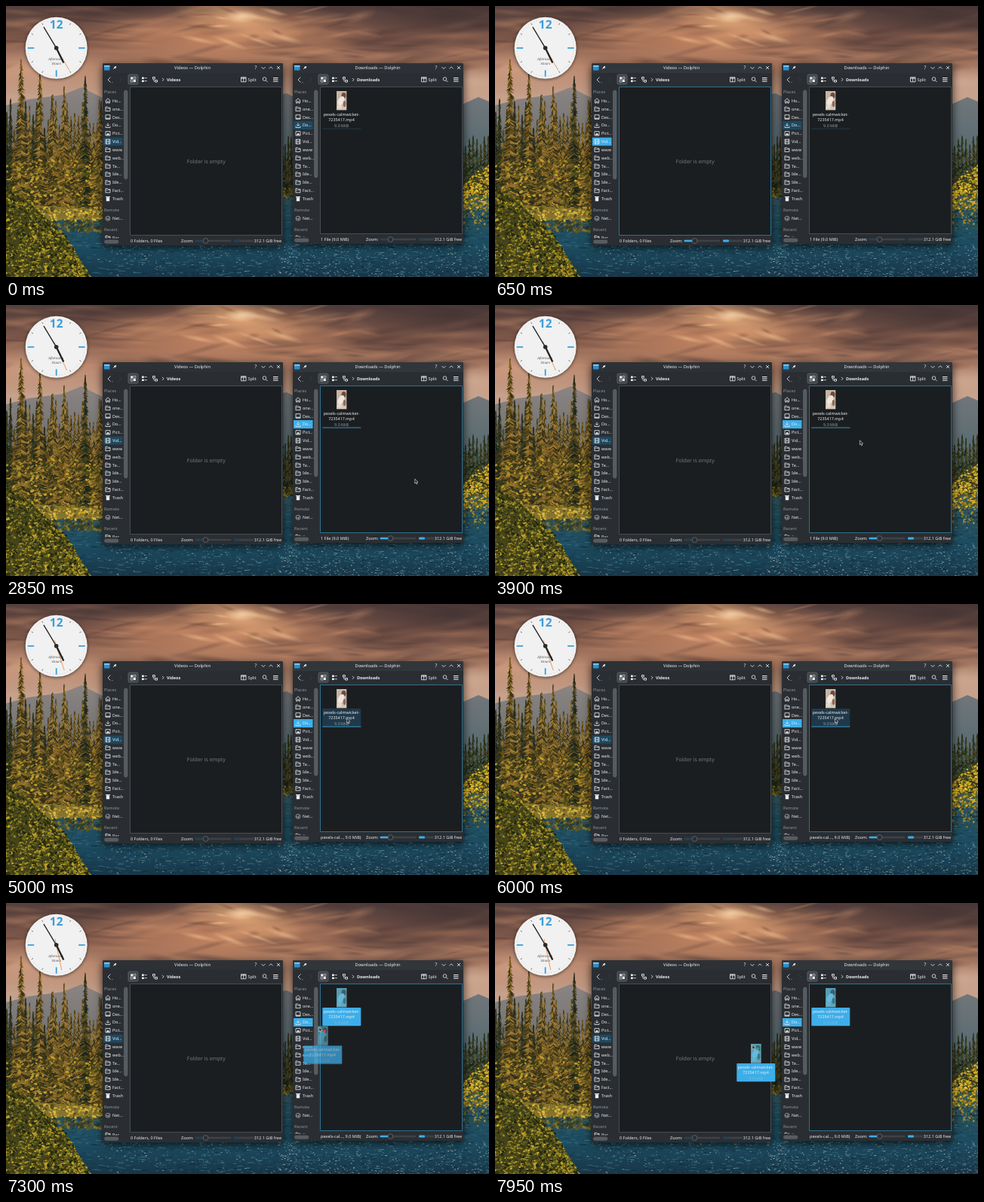
An HTML page with a canvas for the animation above (8000 ms loop, 640 px wide and 360 px high).

```html
<!DOCTYPE html>
<html lang="en">
<head>
<meta charset="utf-8">
<title>Desktop file drag</title>
<style>
html, body { margin: 0; width: 100%; height: 100%; overflow: hidden; background: #1b1e20; }
canvas { display: block; width: 640px; height: 360px; }
</style>
</head>
<body>
<canvas id="stage" width="640" height="360"></canvas>
<script>
const LOOP = 8000;
const BLUE = '#3daee9', TEXT = '#eceef0', DIM = '#8f9498';
const stage = document.getElementById('stage').getContext('2d');
let c = stage;

const clamp = (v) => Math.max(0, Math.min(1, v));
const ramp = (t, from, to) => clamp((t - from) / (to - from));
const mix = (a, b, k) => a + (b - a) * k;

let seed = 7;
function rnd(lo = 0, hi = 1) {
  seed = (seed * 16807) % 2147483647;
  return lo + (hi - lo) * seed / 2147483647;
}
const pick = (list) => list[Math.floor(rnd(0, list.length))];

function rect(x, y, w, h, fill, r = 0) {
  c.fillStyle = fill;
  c.beginPath();
  c.roundRect(x, y, w, h, r);
  c.fill();
}
function frame(x, y, w, h, color, r = 0, lw = 1) {
  c.strokeStyle = color;
  c.lineWidth = lw;
  c.beginPath();
  c.roundRect(x, y, w, h, r);
  c.stroke();
}
function poly(points, fill) {
  c.fillStyle = fill;
  c.beginPath();
  points.forEach(([x, y]) => c.lineTo(x, y));
  c.closePath();
  c.fill();
}
function line(points, color, lw = 0.8) {
  c.strokeStyle = color;
  c.lineWidth = lw;
  c.beginPath();
  points.forEach(([x, y], i) => i ? c.lineTo(x, y) : c.moveTo(x, y));
  c.stroke();
}
function oval(x, y, rx, ry, fill, angle = 0) {
  c.fillStyle = fill;
  c.beginPath();
  c.ellipse(x, y, rx, ry, angle, 0, Math.PI * 2);
  c.fill();
}
function text(str, x, y, size = 5.5, color = TEXT, align = 'left', style = '') {
  c.font = `${style} ${size}px "Noto Sans", sans-serif`;
  c.textAlign = align;
  c.textBaseline = 'middle';
  c.textRendering = 'geometricPrecision';
  c.fillStyle = color;
  c.fillText(str, x, y);
}
function vertical(y0, y1, ...stops) {
  const g = c.createLinearGradient(0, y0, 0, y1);
  stops.forEach((s, i) => g.addColorStop(i / (stops.length - 1), s));
  return g;
}

// Wallpaper

function glow(x, y, rx, ry, rgb, alpha, angle = 0) {
  c.save();
  c.translate(x, y);
  c.rotate(angle);
  c.scale(rx, ry);
  const g = c.createRadialGradient(0, 0, 0, 0, 0, 1);
  g.addColorStop(0, `rgba(${rgb},${alpha})`);
  g.addColorStop(1, `rgba(${rgb},0)`);
  c.fillStyle = g;
  c.fillRect(-1, -1, 2, 2);
  c.restore();
}
function pine(x, top, base, half, colors) {
  line([[x, top], [x, base]], '#2a2417', 1);
  for (let y = top; y < base; y += 1.8) {
    const w = half * ((y - top) / (base - top)) ** 0.7 + 0.8;
    const l = w * rnd(0.3, 1.15), r = w * rnd(0.3, 1.15);
    poly([[x, y - 2], [x + r, y + rnd(2, 4)], [x, y + 2]], pick(colors));
    poly([[x, y - 2], [x - l, y + rnd(2, 4)], [x, y + 2]], pick(colors));
  }
}
function leaves(count, x0, x1, topAt, bottom, colors, size) {
  for (let i = 0; i < count; i++) {
    const x = rnd(x0, x1), y = mix(topAt(x), bottom, rnd());
    oval(x, y, rnd(0.5, size), rnd(0.4, size * 0.6), pick(colors), rnd(-1, 1));
  }
}
function paintSky() {
  rect(0, 0, 640, 220, vertical(0, 160, '#54403d', '#7a5548', '#a57760', '#c7a18b', '#b5a39a'));
  glow(290, 42, 210, 50, '222,150,106', 0.75);
  glow(30, 84, 150, 32, '228,176,146', 0.6);
  glow(600, 100, 120, 22, '224,190,166', 0.6);
  for (let i = 0; i < 110; i++) {
    const light = rnd() < 0.5;
    glow(rnd(-20, 660), rnd(0, 85), rnd(18, 70), rnd(2, 8), light ? '216,152,112' : '62,45,46',
      rnd(0.15, 0.4), rnd(-0.3, 0.2));
  }
  glow(590, 14, 130, 30, '56,44,46', 0.65);
  glow(150, 4, 130, 16, '62,46,45', 0.5);
  glow(520, 52, 110, 14, '76,55,52', 0.5);
  glow(308, 18, 90, 30, '244,182,128', 0.75, 0.25);
  for (let i = 0; i < 16; i++) {
    glow(rnd(240, 380), rnd(5, 60), rnd(10, 36), rnd(2, 5), i % 2 ? '250,204,152' : '120,78,60',
      0.5, rnd(-0.2, 0.5));
  }
  glow(312, 14, 24, 9, '255,224,182', 0.7);
}
function paintMountains() {
  poly([[0, 132], [30, 124], [75, 118], [100, 108], [140, 128], [170, 150], [170, 280], [0, 280]],
    vertical(108, 220, '#8b8482', '#62696a'));
  poly([[350, 120], [372, 116], [390, 125], [520, 180], [606, 130], [626, 121], [640, 127], [640, 250], [350, 250]],
    vertical(115, 215, '#73777b', '#50686f'));
}
function paintForest() {
  const dark = ['#1c2419', '#28301d', '#3b3a1f', '#4c431f'];
  const gold = ['#4a3f1a', '#6b5220', '#8a6a28', '#33301a', '#a07c34'];
  rect(0, 190, 135, 82, vertical(175, 272, '#45411f', '#38391b'));
  for (let x = -4; x < 135; x += 5) pine(x, rnd(118, 165), 268, rnd(7, 10), rnd() < 0.4 ? dark : gold);
  pine(20, 71, 266, 14, gold);
  pine(105, 93, 268, 11, dark.concat('#65501f'));
  pine(77, 107, 268, 12, gold);
  pine(45, 90, 266, 13, gold);
  pine(62, 118, 268, 10, gold);
  pine(124, 125, 268, 9, gold);
  leaves(420, 0, 135, () => 205, 272, ['#a88b28', '#6d661f', '#343819', '#c29c2e', '#4b4a1b'], 3.2);
  for (let x = 366; x < 386; x += 4) pine(x, rnd(165, 185), 252, 5, dark);
  for (let x = 604; x < 646; x += 5) pine(x, rnd(165, 190), 250, 7, dark.concat('#3e4f36'));
  leaves(40, 364, 384, () => 242, 254, ['#8d7726', '#5f5b20'], 2.5);
}
function paintLake() {
  rect(0, 246, 640, 114, vertical(246, 360, '#3c5a63', '#23505f', '#1d4b60', '#173647'));
  for (let i = 0; i < 2200; i++) {
    const y = rnd(248, 360);
    c.globalAlpha = rnd(0.2, 0.65);
    rect(rnd(-6, 640), y, rnd(2, 9), rnd(0.5, 1.4), pick(['#0c222f', '#34718a', '#4f8a9b', '#123245']));
  }
  for (let i = 0; i < 900; i++) {
    c.globalAlpha = rnd(0.25, 0.9);
    const right = rnd() < 0.6;
    rect(right ? rnd(360, 640) : rnd(120, 400), 316 + 44 * rnd() ** (right ? 1 : 2), rnd(0.6, 2.4), 0.8,
      pick(['#b4c8c8', '#86b0b8', '#dfd4c2']));
  }
  c.globalAlpha = 1;
}
function paintShore() {
  leaves(200, 60, 135, () => 280, 300, ['#5b5427', '#343f2a', '#84732f', '#243a3c'], 4);
  poly([[0, 262], [70, 267], [135, 271], [135, 283], [0, 286]], '#86722c');
  leaves(280, 0, 135, () => 267, 285, ['#c9a634', '#8a7a2b', '#dcb944', '#4f4d20'], 2.8);
  const bank = (x) => 240 + Math.max(0, x - 10) * 0.9 + Math.max(0, x - 75) * 0.8;
  poly([[0, 246], [20, 252], [60, 288], [84, 314], [112, 360], [0, 360]], '#44431a');
  leaves(1700, -4, 112, bank, 364, ['#9c8722', '#5f5a1b', '#2c2f14', '#c2a32a', '#737022', '#1f250e'], 2.6);
  leaves(420, 602, 644, (x) => 250 - 38 * Math.sin((x - 598) / 30), 270,
    ['#d3a822', '#ecc432', '#8d781f', '#b8962a', '#565820'], 2.8);
  leaves(110, 602, 644, () => 270, 296, ['#86762d', '#3c4a36', '#1e3437', '#a58d34'], 2.6);
}
function paintWallpaper() {
  const layer = document.createElement('canvas');
  layer.width = 640;
  layer.height = 360;
  c = layer.getContext('2d');
  paintSky();
  paintMountains();
  paintLake();
  paintForest();
  paintShore();
  c = stage;
  return layer;
}
const wallpaper = paintWallpaper();

// Clock

const clock = { x: 66.7, y: 55.8, r: 41 };

function ray(degrees, from, to, color, lw) {
  const a = degrees * Math.PI / 180, sx = Math.sin(a), sy = -Math.cos(a);
  const at = (d) => [clock.x + sx * d, clock.y + sy * d];
  line([at(from), at(to)], color, lw);
}
function drawClock(t) {
  c.save();
  c.shadowColor = 'rgba(0,0,0,.6)';
  c.shadowBlur = 4;
  c.shadowOffsetY = 1;
  oval(clock.x, clock.y, clock.r, clock.r, '#f1f1f1');
  c.restore();
  for (let i = 1; i < 60; i++) {
    if (i % 15 === 0) ray(i * 6, 29.5, 38, '#3b9ed8', 1.8);
    else if (i % 5 === 0) ray(i * 6, 35.5, 38, '#555', 0.8);
    else ray(i * 6, 37, 38, '#aaa', 0.5);
  }
  text('12', clock.x, 26, 15.5, '#3b9ed8', 'center', '600');
  c.font = 'italic 4.3px "Noto Serif", serif';
  c.fillStyle = '#555';
  c.fillText('Afternoon', 66, 70.5);
  c.fillText('Hours', 67, 76.5);
  ray(150 + 6 * Math.floor(t / 2100), -8, 34, '#e8823c', 0.8);
  ray(154, 0, 22, '#222', 2.3);
  ray(329, 0, 32.5, '#222', 1.3);
  oval(clock.x, clock.y, 2.8, 2.8, '#2b2b2b');
}

// File manager windows

const places = ['Ho...', 'one...', 'Des...', 'Do...', 'Pict...', 'Vid...', 'www', 'web...',
  'Te...', 'Ide...', 'Ide...', 'Fact...', 'Trash'];
const videos = { x: 128, w: 239, bottom: 318, name: 'Videos', selected: 5, zoom: 232 };
const downloads = { x: 380, w: 226, bottom: 316, name: 'Downloads', selected: 3, zoom: 477 };

function placeIcon(name, x, y) {
  if (name === 'Ho...') {
    line([[x - 3.4, y], [x, y - 3.2], [x + 3.4, y]], TEXT);
    line([[x - 2.4, y - 0.6], [x - 2.4, y + 3], [x - 0.8, y + 3], [x - 0.8, y + 0.8], [x + 0.8, y + 0.8],
      [x + 0.8, y + 3], [x + 2.4, y + 3], [x + 2.4, y - 0.6]], TEXT);
  } else if (name === 'Do...') {
    line([[x, y - 3], [x, y + 1]], TEXT);
    line([[x - 2, y - 1], [x, y + 1], [x + 2, y - 1]], TEXT);
    line([[x - 3, y + 1], [x - 3, y + 3], [x + 3, y + 3], [x + 3, y + 1]], TEXT);
  } else if (name === 'Net...') {
    c.strokeStyle = TEXT;
    c.beginPath();
    c.arc(x, y, 3, 0, Math.PI * 2);
    c.stroke();
    line([[x - 2.5, y], [x + 1, y + 1.5], [x + 1, y - 1.5]], TEXT, 0.6);
  } else if (name === 'Trash') {
    rect(x - 2.2, y - 1.6, 4.4, 4.8, TEXT);
    rect(x - 3, y - 3, 6, 1, TEXT);
  } else if (name === 'Vid...') {
    frame(x - 3, y - 3, 6, 6, TEXT, 0, 0.8);
    line([[x - 1.6, y - 3], [x - 1.6, y + 3]], TEXT, 0.8);
    line([[x + 1.6, y - 3], [x + 1.6, y + 3]], TEXT, 0.8);
    line([[x - 1.6, y], [x + 1.6, y]], TEXT, 0.8);
  } else if (name === 'Des...') {
    frame(x - 3, y - 3, 6, 5.6, TEXT, 0, 0.8);
    line([[x - 3, y + 1.6], [x + 3, y + 1.6]], TEXT, 1);
  } else if (name === 'Pict...') {
    frame(x - 3, y - 2.7, 6, 5.4, TEXT, 0, 0.8);
    poly([[x - 2.4, y + 2.3], [x, y - 0.8], [x + 2.6, y + 2.3]], TEXT);
  } else {
    line([[x - 3, y + 2.7], [x - 3, y - 2.7], [x - 0.5, y - 2.7], [x + 0.3, y - 1.7],
      [x + 3, y - 1.7], [x + 3, y + 2.7], [x - 3.3, y + 2.7]], TEXT);
    line([[x - 3, y - 0.6], [x + 3, y - 0.6]], TEXT, 0.5);
  }
}
function drawTitleBar(win, active) {
  const { x, w } = win, right = x + w;
  rect(x, 76, w, 13, active > 0.5 ? '#31363b' : '#2d3136', [2, 2, 0, 0]);
  rect(x + 2, 79, 7.5, 6.5, '#2b8fd0', 0.8);
  rect(x + 2, 79, 7.5, 1.6, '#9dd9f8', 0.5);
  line([[x + 14, 84], [x + 16, 82]], TEXT, 0.8);
  line([[x + 15, 81], [x + 17.2, 83.2]], TEXT, 0.8);
  line([[x + 16.2, 82], [x + 17.8, 80.4]], TEXT, 2);
  text(`${win.name} — Dolphin`, x + w / 2 - 0.5, 82, 5.75, TEXT, 'center');
  text('?', right - 36, 82, 6.5, TEXT, 'center');
  line([[right - 28.5, 81], [right - 26, 83.5], [right - 23.5, 81]], TEXT);
  line([[right - 18.5, 83.3], [right - 16, 80.8], [right - 13.5, 83.3]], TEXT);
  line([[right - 8, 80], [right - 4, 84]], TEXT);
  line([[right - 8, 84], [right - 4, 80]], TEXT);
}
function drawToolbar(win) {
  const { x, w } = win, right = x + w;
  line([[x + 10.5, 94.5], [x + 7, 98], [x + 10.5, 101.5]], TEXT);
  rect(x + 12.5, 101, 1, 1, DIM);
  line([[x + 22, 94.5], [x + 25.5, 98], [x + 22, 101.5]], '#3c4145');
  rect(x + 34, 91, 13, 13, '#41464b', 1.5);
  frame(x + 34, 91, 13, 13, '#62686c', 1.5, 0.8);
  for (let i = 0; i < 4; i++) {
    const dx = (i % 2) * 3.8, dy = (i >> 1) * 3.8;
    const cell = [x + 37.2 + dx, 94.3 + dy, 2.9, 2.9];
    if (i === 1 || i === 2) frame(...cell, TEXT, 0, 0.6);
    else rect(...cell, TEXT);
  }
  for (let i = 0; i < 2; i++) {
    const y = 94.5 + i * 4;
    rect(x + 52, y, 2.8, 2.5, TEXT);
    rect(x + 55.6, y + 0.8, 3.2, 0.8, TEXT);
    frame(x + 66.5 + i * 3.2, y, 2.8, 2.5, TEXT, 0, 0.9);
  }
  line([[x + 67.7, 97], [x + 67.7, 99.8], [x + 69.7, 99.8]], TEXT, 0.6);
  line([[x + 79, 95.8], [x + 81, 97.8], [x + 79, 99.8]], TEXT);
  text(win.name, x + 85, 98, 5.5, TEXT, 'left', 'bold');
  frame(right - 55.5, 94.7, 6.5, 6, TEXT, 0, 0.8);
  line([[right - 52.3, 95], [right - 52.3, 100.5]], TEXT);
  line([[right - 55.5, 96], [right - 49, 96]], TEXT, 1);
  text('Split', right - 46.5, 98);
  c.strokeStyle = TEXT;
  c.lineWidth = 0.8;
  c.beginPath();
  c.arc(right - 24.5, 97, 2.3, 0, Math.PI * 2);
  c.stroke();
  line([[right - 22.8, 98.7], [right - 20.5, 101]], TEXT);
  for (let y = 95; y < 101; y += 2.3) rect(right - 13, y, 6.5, 1, TEXT);
}
function drawSidebar(win, active) {
  const { x, bottom } = win;
  const row = (name, y) => {
    placeIcon(name, x + 7, y);
    text(name, x + 13, y + 0.3);
  };
  c.save();
  c.beginPath();
  c.rect(x + 1, 107, 35, bottom - 116.5);
  c.clip();
  text('Places', x + 2, 114.5, 5.5, DIM);
  places.forEach((name, i) => {
    const y = 126 + i * 10.83;
    if (i === win.selected) {
      rect(x + 1, y - 5.4, 25.5, 10.8, '#1e4860');
      c.globalAlpha = active;
      rect(x + 1, y - 5.4, 25.5, 10.8, BLUE);
      c.globalAlpha = 1;
    }
    row(name, y);
  });
  text('Remote', x + 2, 271, 5.5, DIM);
  row('Net...', 282.2);
  text('Recent', x + 2, 297, 5.5, DIM);
  row('Rec...', 308);
  c.restore();
  const scrollHeight = bottom - 200;
  rect(x + 28.5, 112, 4.5, scrollHeight, '#565b60', 2.2);
  frame(x + 28.5, 112, 4.5, scrollHeight, '#686e72', 2.2, 0.5);
  rect(x + 2.5, bottom - 7, 18.5, 4.3, '#565b60', 2.1);
  frame(x + 2.5, bottom - 7, 18.5, 4.3, '#686e72', 2.1, 0.5);
}
function drawStatus(win, active, info) {
  const { zoom } = win, right = win.x + win.w, y = win.bottom - 6;
  text(info, win.x + 37, y);
  text('Zoom:', zoom, y);
  rect(zoom + 18.5, y - 1.3, 48, 2.6, '#3d4247', 1.3);
  rect(zoom + 70, y - 1.5, right - 39 - zoom - 70, 3, '#3b4045', 1.3);
  rect(zoom + 18.5, y - 1.3, 14, 2.6, '#234154', 1.3);
  rect(zoom + 70, y - 1.5, 8, 3, '#234154', 1.3);
  c.globalAlpha = active;
  rect(zoom + 18.5, y - 1.3, 14, 2.6, BLUE, 1.3);
  rect(zoom + 70, y - 1.5, 8, 3, BLUE, 1.3);
  c.globalAlpha = 1;
  oval(zoom + 32.5, y, 3.4, 3.4, '#2a2e32');
  c.strokeStyle = '#6f757a';
  c.lineWidth = 0.7;
  c.stroke();
  text('312.1 GiB free', right - 2, y, 5.5, TEXT, 'right');
}
function drawWindow(win, active, info) {
  const { x, w, bottom } = win;
  c.save();
  c.shadowColor = 'rgba(0,0,0,.75)';
  c.shadowBlur = 12;
  c.shadowOffsetY = 3;
  rect(x, 76, w, bottom - 76, '#2a2e32', 2);
  c.restore();
  drawTitleBar(win, active);
  drawToolbar(win);
  drawSidebar(win, active);
  const box = [x + 36.5, 107.5, w - 38, bottom - 121];
  rect(...box, '#1b1e20');
  frame(...box, '#464d53');
  c.globalAlpha = active;
  frame(...box, '#2f6f90');
  c.globalAlpha = 1;
  drawStatus(win, active, info);
}

// The dragged file; its origin is the thumbnail's top left corner

function drawFile(x, y, state, active) {
  const selected = state === 'selected';
  c.save();
  c.translate(x, y);
  rect(0, 0, 13.3, 25.3, vertical(0, 25, '#c8b6a6', '#c3b0a0', '#d8cabb'));
  oval(9.5, 6, 3, 4, '#6f4a3d');
  oval(6, 13, 4, 6.5, '#efe6dd', 0.5);
  oval(10.5, 17, 1.8, 4, '#8d6a58');
  oval(4, 21, 3, 2.5, '#e6d9cc');
  if (selected) {
    c.globalCompositeOperation = 'multiply';
    rect(0, 0, 13.3, 25.3, '#7fd2f4');
    c.globalCompositeOperation = 'source-over';
    rect(0, 0, 13.3, 25.3, 'rgba(61,174,233,.3)');
    rect(-18.7, 26, 51, 24.3, BLUE, 0.8);
  } else {
    if (state === 'hover') rect(-18.7, 26, 51, 24.3, '#20394a', 0.8);
    c.globalAlpha = 0.2 + 0.6 * active;
    rect(-18.7, 49.6, 51, 0.8, BLUE);
    c.globalAlpha = 1;
  }
  text('pexels-calmwicket-', 6.5, 31.3, 5.4, TEXT, 'center');
  text('7235417.mp4', 6.5, 38.6, 5.4, TEXT, 'center');
  text('9.0 MiB', 6.5, 46, 5.4, selected ? '#83b7d4' : '#92a0aa', 'center');
  c.restore();
}

// Time, x, y
const pointerPath = [
  [800, 650, 300], [1500, 578, 238.5], [2300, 544, 231], [3000, 541.5, 231],
  [4500, 452, 152], [6000, 450.5, 152], [6800, 440, 144], [7050, 440, 144],
  [7300, 415, 165], [7950, 341, 188.5], [8000, 339, 189],
];
function pointerAt(t) {
  const i = pointerPath.findIndex((p) => p[0] > t);
  if (i < 1) return [700, 300];
  const [t0, x0, y0] = pointerPath[i - 1], [t1, x1, y1] = pointerPath[i];
  const k = ramp(t, t0, t1), e = t < 7050 ? k * k * (3 - 2 * k) : k;
  return [mix(x0, x1, e), mix(y0, y1, e)];
}
function drawPointer(x, y) {
  const shape = [[x, y], [x, y + 6], [x + 1.4, y + 4.8], [x + 2.4, y + 7],
    [x + 3.4, y + 6.5], [x + 2.5, y + 4.4], [x + 4.2, y + 4.2]];
  poly(shape, '#202428');
  line([...shape, shape[0]], '#e6e8ea', 0.6);
}

function draw(t) {
  const active = ramp(t, 2250, 2400);
  const videosActive = ramp(t, 50, 250) * (1 - active);
  const [px, py] = pointerAt(t);
  const hovering = t > 4150 && t < 6850;
  const selected = t >= 6850, dragging = t >= 7080;
  const named = (hovering && t < 6800) || dragging;

  c.drawImage(wallpaper, 0, 0);
  drawClock(t);
  drawWindow(videos, videosActive, '0 Folders, 0 Files');
  text('Folder is empty', 265.3, 207, 7.05, '#74797c', 'center');
  drawWindow(downloads, active, named ? 'pexels-cal..., 9.0 MiB)' : '1 File (9.0 MiB)');
  drawFile(438, 113, selected ? 'selected' : hovering ? 'hover' : 'idle', active);

  if (dragging) {
    const ghost = document.createElement('canvas');
    ghost.width = 54;
    ghost.height = 54;
    c = ghost.getContext('2d');
    drawFile(20, 1, 'selected', 1);
    c = stage;
    c.globalAlpha = mix(0.65, 1, ramp(t, 7200, 7600));
    c.drawImage(ghost, px - 22, py - 2.5);
    c.globalAlpha = 1;
    oval(px + 7, py + 5, 1.9, 1.9, px > 366 ? '#d9433f' : '#35a878');
  }
  drawPointer(px, py);
}

const start = performance.now();
function tick() {
  draw((performance.now() - start) % LOOP);
  requestAnimationFrame(tick);
}
tick();
</script>
</body>
</html>
```
